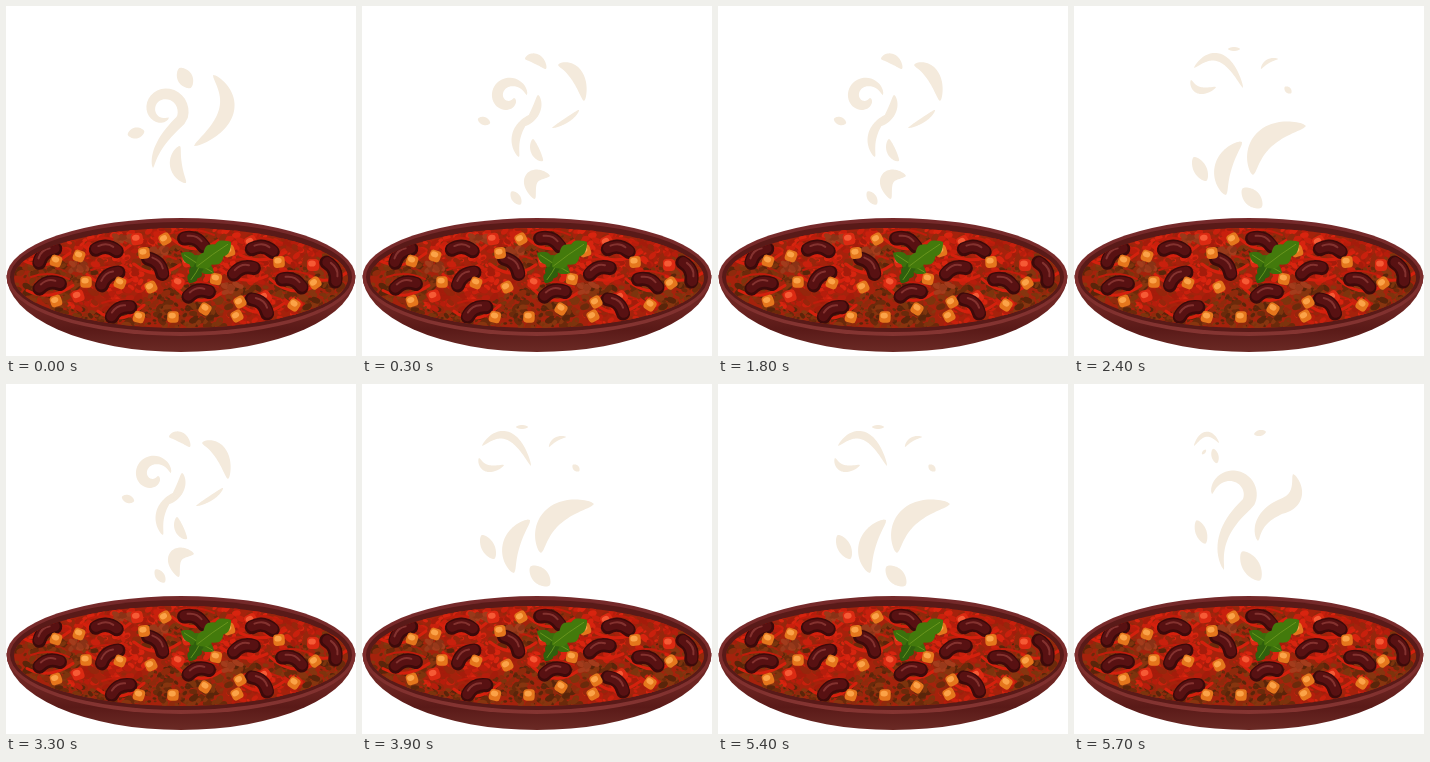
Write an HTML page with a canvas that moves like this. It is 350 by 350 pixels and loops after 6.01 s.

```html
<!DOCTYPE html>
<html lang="en">
<head>
<meta charset="utf-8">
<title>Steaming bean stew</title>
<style>
  html, body { margin: 0; width: 100%; height: 100%; overflow: hidden; background: #fff; }
  canvas { display: block; width: 100vw; height: 100vh; }
</style>
</head>
<body>
<canvas id="stage"></canvas>
<script>
const SIZE = 350, LOOP = 6010, STEP = 300, STEPS = 20, STEAM_HEIGHT = 208;
const TAU = Math.PI * 2;
const canvas = document.getElementById('stage');
const ratio = window.devicePixelRatio || 1;
canvas.width = canvas.height = SIZE * ratio;
const ctx = canvas.getContext('2d');
ctx.scale(ratio, ratio);
ctx.lineCap = ctx.lineJoin = 'round';

let seed = 41;
const rnd = () => (seed = seed * 16807 % 2147483647) / 2147483647;
const spread = range => (rnd() - .5) * range;
const pick = list => list[Math.floor(rnd() * list.length)];

function ellipse(x, y, rx, ry, fill, turn = 0, from = 0, to = TAU) {
  ctx.beginPath();
  ctx.ellipse(x, y, rx, ry, turn, from, to);
  ctx.fillStyle = fill;
  ctx.fill();
}
function at(x, y, turn, draw) {
  ctx.save();
  ctx.translate(x, y);
  ctx.rotate(turn);
  draw();
  ctx.restore();
}
function arc(x0, y0, cx, cy, x1, y1, width, color) {
  ctx.beginPath();
  ctx.moveTo(x0, y0);
  ctx.quadraticCurveTo(cx, cy, x1, y1);
  ctx.lineWidth = width;
  ctx.strokeStyle = color;
  ctx.stroke();
}
function shade(y0, y1, ...colors) {
  const paint = ctx.createLinearGradient(0, y0, 0, y1);
  colors.forEach((color, i) => paint.addColorStop(i / (colors.length - 1), color));
  return paint;
}

// Ingredients
function bean(x, y, degrees) {
  at(x, y, degrees * Math.PI / 180, () => {
    arc(-10, 2, 0, -6, 11, 1, 14, '#3c0a0a');
    arc(-10, 1, 0, -6, 11, 0, 10, '#581112');
    arc(-8, -2, 0, -7, 7, -3, 2, '#84322f');
  });
}
function chunk(x, y, size, base, light) {
  at(x, y, spread(1.2), () => {
    ctx.beginPath();
    ctx.roundRect(-size / 2, -size / 2, size, size, size * .32);
    ctx.fillStyle = base;
    ctx.fill();
    ellipse(-size * .08, -size * .12, size * .32, size * .25, light);
  });
}
function crumb(x, y, r, fill) {
  ellipse(x, y, r * 1.3, r * .8, fill, spread(2));
}
function leaf(x0, y0, x1, y1, width, fill) {
  const length = Math.hypot(x1 - x0, y1 - y0);
  at(x0, y0, Math.atan2(y1 - y0, x1 - x0), () => {
    ctx.beginPath();
    for (let i = 0; i <= 48; i++) {
      const t = 1 - Math.abs(i / 24 - 1), side = i < 24 ? 1 : -1;
      const lobe = .72 + .28 * Math.abs(Math.sin(t * Math.PI * 3));
      ctx.lineTo(t * length, side * width * Math.sin(t * Math.PI) ** .65 * lobe);
    }
    ctx.fillStyle = fill;
    ctx.fill();
    arc(2, 0, length / 2, -1, length - 4, 0, .8, '#6f9a20');
  });
}

// Brown mince and red sauce alternate in soft waves.
function sauce() {
  const brown = ['#6b2a0b', '#7d340d', '#5a250a', '#87350f', '#8f2a0c'];
  const red = ['#b61d0c', '#c9200d', '#a41c0b', '#d8240f', '#96260c'];
  for (let i = 0; i < 1500; i++) {
    const a = rnd() * TAU, s = Math.sqrt(rnd());
    const x = 175 + Math.cos(a) * s * 167, y = 272 + Math.sin(a) * s * 50;
    const meaty = Math.sin(x / 23) + Math.cos(y / 9 + x / 40) + (y - 275) / 50 > -.1;
    crumb(x, y, 1 + rnd() * 3, pick(meaty ? brown : red));
  }
}

function dish() {
  ellipse(175, 269, 174.5, 77, shade(300, 346, '#6e2522', '#5a1a18', '#6b2a25'), 0, 0, Math.PI);
  ellipse(175, 271, 174.5, 59, shade(212, 330, '#74292a', '#7c2c2b', '#853532'));
  ellipse(175, 271, 171, 55, '#591a18');
  ctx.save();
  ctx.beginPath();
  ctx.ellipse(175, 272, 167, 50, 0, 0, TAU);
  ctx.clip();
  ctx.fillStyle = '#a5220c';
  ctx.fillRect(0, 212, SIZE, 120);
  sauce();

  const beans = [[40, 249, -38], [100, 243, 7], [103, 272, -35], [150, 259, 50], [114, 305, -25],
    [192, 287, -10], [237, 264, -15], [256, 243, 10], [188, 235, 25], [286, 276, 25],
    [326, 265, 68], [254, 299, 45], [43, 279, -10]];
  for (const [x, y] of beans) {
    arc(x - 22, y + spread(12), x, y + 17, x + 24, y + spread(12), 3, '#d5200d');
    arc(x - 18, y - 8, x, y - 15, x + 20, y - 6, 2, '#c11c0b');
  }
  for (const [x, y] of [[117, 234], [151, 246], [72, 262], [225, 283]])
    for (let i = 0; i < 12; i++) crumb(x + spread(18), y + spread(10), 3, pick(['#98391a', '#8a3216', '#a43c1c']));
  for (const [x, y] of [[72, 290], [245, 236], [182, 255], [172, 277], [307, 259], [131, 233], [259, 291]])
    chunk(x, y, 12, '#dc2a12', '#f65a35');
  beans.forEach(spot => bean(...spot));
  const corn = [[50, 255], [73, 250], [80, 276], [50, 295], [114, 277], [138, 247], [159, 233],
    [145, 281], [133, 311], [167, 311], [199, 303], [210, 273], [223, 245], [273, 256],
    [234, 296], [231, 310], [288, 299], [309, 277]];
  for (const [x, y] of corn) chunk(x, y, 11.5, '#e5761c', '#fba348');
  ctx.restore();

  leaf(208, 267, 175, 247, 8, '#3b700c');
  leaf(196, 256, 183, 277, 7, '#2f600d');
  leaf(190, 261, 225, 236, 11, '#437a0c');
}

// Steam: a spine maps 0..1 to a point; a wisp sweeps a tapered brush along it.
const bend = (x0, y0, cx, cy, x1, y1) => t => {
  const u = 1 - t;
  return [u * u * x0 + 2 * u * t * cx + t * t * x1, u * u * y0 + 2 * u * t * cy + t * t * y1];
};
const curl = (x, y, r0, r1, a0, a1) => t => {
  const r = r0 + (r1 - r0) * t, a = a0 + (a1 - a0) * t;
  return [x + r * Math.cos(a), y + r * Math.sin(a)];
};
const join = (first, second) => t => t < .4 ? first(t / .4) : second((t - .4) / .6);

function wisp(width, spine) {
  const left = [], right = [], n = 48;
  for (let i = 0; i <= n; i++) {
    const t = i / n, [x, y] = spine(t);
    const [ax, ay] = spine(Math.max(0, t - .01)), [bx, by] = spine(Math.min(1, t + .01));
    const half = width / 2 * Math.sin(Math.PI * t) ** .6 / Math.hypot(bx - ax, by - ay);
    left.push([x - (by - ay) * half, y + (bx - ax) * half]);
    right.unshift([x + (by - ay) * half, y - (bx - ax) * half]);
  }
  ctx.beginPath();
  [...left, ...right].forEach(point => ctx.lineTo(...point));
  ctx.fill();
}
const stroke = (width, ...points) => wisp(width, bend(...points));
const drop = (x, y, length, width, degrees) => {
  const dx = Math.cos(degrees * Math.PI / 180) * length / 2;
  const dy = Math.sin(degrees * Math.PI / 180) * length / 2;
  stroke(width, x - dx, y - dy, x, y, x + dx, y + dy);
};

const poses = [
  () => {
    wisp(11, join(bend(147, 162, 147, 140, 175, 114), curl(158, 104, 20, 9, .5, -5.3)));
    stroke(15, 207, 69, 243, 106, 188, 140);
    stroke(12, 174, 140, 163, 160, 180, 177);
    drop(179, 72, 23, 15, 60);
    drop(130, 127, 17, 11, -12);
  },
  () => {
    wisp(11, curl(147, 91, 18, 5, -.1, -6.1));
    stroke(9, 176, 89, 178, 106, 162, 120);
    stroke(9, 171, 108, 146, 126, 157, 151);
    stroke(13, 196, 59, 219, 60, 222, 95);
    stroke(10, 163, 53, 175, 48, 184, 63);
    stroke(5, 190, 122, 208, 114, 217, 104);
    stroke(9, 171, 133, 171, 147, 181, 155);
    stroke(14, 188, 170, 159, 164, 173, 193);
    drop(122, 115, 13, 8, 20);
    drop(154, 192, 16, 9, 55);
  },
  () => {
    wisp(9, curl(145, 74, 25, 12, 0, -4.7));
    stroke(9, 196, 57, 216, 60, 216, 86);
    stroke(8, 170, 102, 170, 113, 158, 127);
    stroke(13, 173, 120, 140, 146, 154, 179);
    stroke(14, 183, 149, 186, 127, 222, 113);
    drop(173, 51, 13, 6, 12);
    drop(127, 146, 17, 9, 60);
    drop(176, 183, 24, 15, 58);
  },
  () => {
    stroke(8, 120, 62, 148, 32, 169, 82);
    stroke(7, 117, 74, 121, 91, 142, 81);
    stroke(4, 187, 63, 192, 53, 204, 53);
    drop(160, 43, 12, 4, 0);
    drop(214, 84, 9, 6, 45);
    drop(126, 163, 27, 13, 62);
    stroke(17, 168, 136, 139, 158, 152, 189);
    stroke(20, 179, 169, 176, 122, 232, 120);
    drop(178, 192, 27, 16, 45);
  },
  () => {
    stroke(5, 120, 62, 132, 40, 145, 59);
    drop(141, 72, 15, 7, 75);
    drop(186, 49, 12, 6, -12);
    drop(130, 68, 6, 3, -50);
    wisp(13, join(bend(150, 186, 138, 152, 173, 120), curl(158, 111, 18, 20, .5, -3.1)));
    wisp(15, join(bend(184, 157, 181, 135, 206, 123), bend(206, 123, 230, 116, 219, 90)));
    drop(127, 148, 25, 11, 70);
    drop(177, 182, 34, 17, 58);
  }
];

dish();
const start = performance.now();
let shown = -1;
function tick(now) {
  const time = Math.max(0, now - start) % LOOP;
  const pose = Math.min(STEPS - 1, Math.floor(time / STEP)) % poses.length;
  if (pose !== shown) {
    ctx.clearRect(0, 0, SIZE, STEAM_HEIGHT);
    ctx.fillStyle = '#f4eadc';
    poses[pose]();
    shown = pose;
  }
  requestAnimationFrame(tick);
}
tick(start);
</script>
</body>
</html>
```
